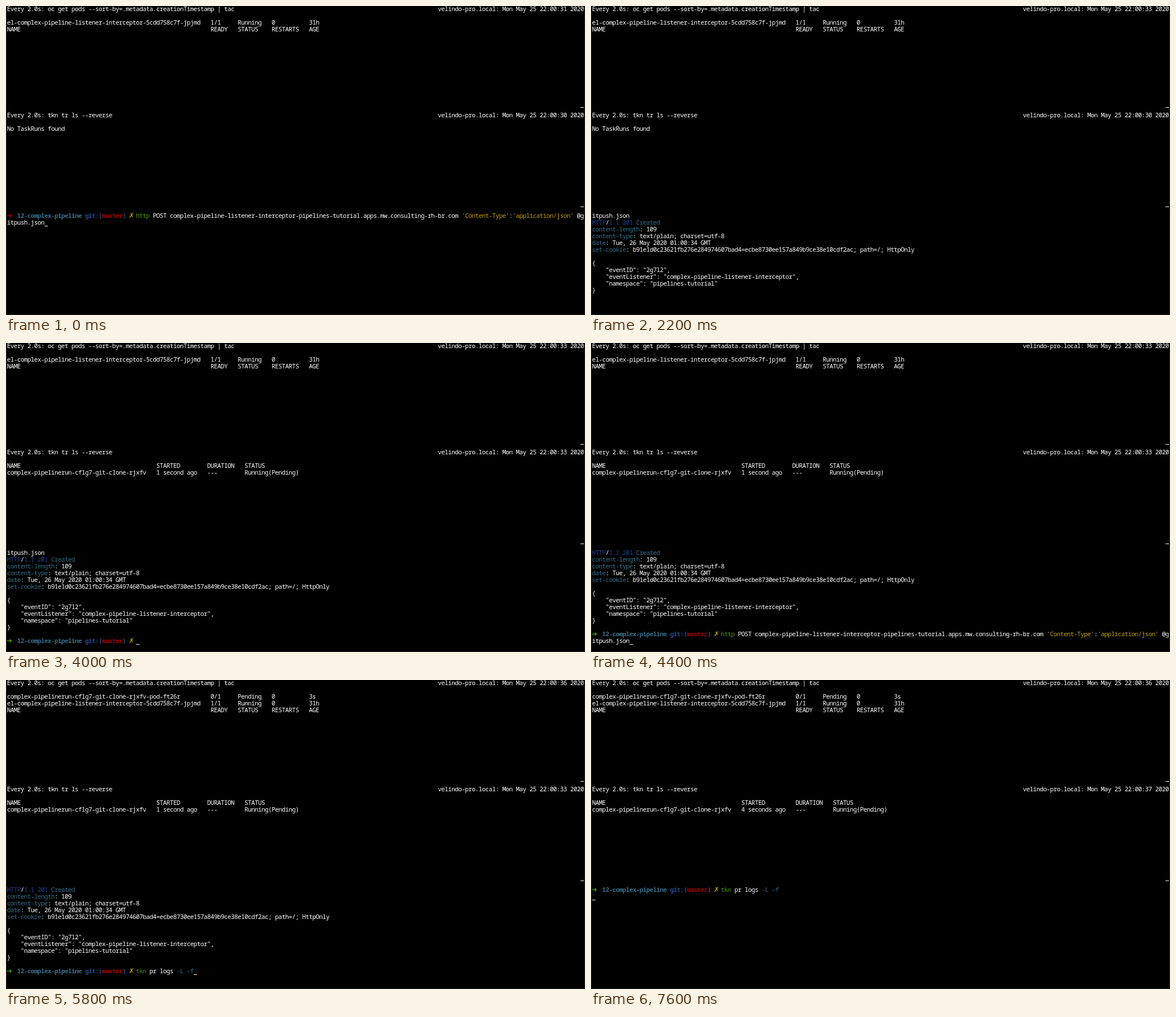
These frames come from a looping animation (1024 px wide and 547 px high, 8 s). An HTML page with a canvas:

```html
<!DOCTYPE html>
<html lang="en">
<head>
<meta charset="utf-8">
<title>Pipeline terminal</title>
<style>
  html, body { margin: 0; height: 100%; overflow: hidden; background: #000; }
  canvas { display: block; }
</style>
</head>
<body>
<canvas id="stage" width="1024" height="547"></canvas>
<script>
const ctx = document.getElementById('stage').getContext('2d');
const LOOP = 8000, COLS = 170, CELL = 6, ROW = 12, LEFT = 2;
const PANES = { pods: 9, tasks: 197, shell: 375 }; // first baselines
const FONT = 'semi-condensed 11px "Noto Sans Mono", "DejaVu Sans Mono", monospace';
const SYMBOL_FONT = '12px "DejaVu Sans", sans-serif';
const COLORS = { w: '#fff', c: '#34718a', b: '#234d94', d: '#1f4794', g: '#4e9a06', y: '#c4a000', r: '#a80000' };

// "~x" switches colour; a capital letter also makes the text bold.
const prompt = arrow => `~${arrow}➜  ~C12-complex-pipeline ~Bgit:(~Rmaster~B) ~Y✗ `;
const post = "~ghttp ~wPOST complex-pipeline-listener-interceptor-pipelines-tutorial" +
  ".apps.mw.consulting-rh-br.com ~y'Content-Type'~w:~y'application/json'~w @gitpush.json";
const logs = '~gtkn ~wpr logs ~c-L -f';
const response = [
  '~dHTTP~w/~d1.1 201 ~cCreated',
  '~ccontent-length~w: 109',
  '~ccontent-type~w: text/plain; charset=utf-8',
  '~cdate~w: Tue, 26 May 2020 01:00:34 GMT',
  '~cset-cookie~w: b91e1d0c23621fb276e284974607bad4=ecbe8730ee157a849b9ce38e10cdf2ac; path=/; HttpOnly',
  '',
  '{',
  '    "eventID": "2g7l2",',
  '    "eventListener": "complex-pipeline-listener-interceptor",',
  '    "namespace": "pipelines-tutorial"',
  '}',
  ''
];

const table = (widths, rows) =>
  rows.map(row => row.map((text, i) => text.padEnd(widths[i] || 0)).join(''));

function writeChar(char, col, baseline, bold) {
  const symbol = '➜✗'.includes(char);
  const x = LEFT + col % COLS * CELL;
  ctx.font = symbol ? SYMBOL_FONT : (bold ? 'bold ' : '500 ') + FONT;
  ctx.textAlign = symbol ? 'left' : 'center';
  ctx.fillText(char, symbol ? x - 1 : x + CELL / 2, baseline + Math.floor(col / COLS) * ROW);
}

function writeLine(line, baseline) {
  let col = 0, color = 'w';
  const chars = [...line];
  for (let i = 0; i < chars.length; i++) {
    if (chars[i] === '~') { color = chars[++i]; continue; }
    const key = color.toLowerCase();
    ctx.fillStyle = COLORS[key];
    if (chars[i] !== ' ') writeChar(chars[i], col, baseline, color !== key);
    col++;
  }
}

const writeLines = (pane, lines) =>
  lines.forEach((line, i) => writeLine(line, PANES[pane] + i * ROW));

function cursor(pane, row, col) {
  ctx.fillStyle = COLORS.w;
  ctx.fillRect(LEFT + col * CELL, PANES[pane] + row * ROW + 2, CELL, 1);
}

function watch(pane, command, second, lines, lastRow) {
  const title = 'Every 2.0s: ' + command;
  const clock = `velindo-pro.local: Mon May 25 22:00:${second} 2020`;
  writeLines(pane, [title + clock.padStart(COLS - title.length), '', ...lines]);
  cursor(pane, lastRow, COLS - 1);
}

function drawPods(t) {
  const rows = [
    ['el-complex-pipeline-listener-interceptor-5cdd758c7f-jpjmd', '1/1', 'Running', '0', '31h'],
    ['NAME', 'READY', 'STATUS', 'RESTARTS', 'AGE']
  ];
  if (t >= 4800) rows.unshift(['complex-pipelinerun-cflg7-git-clone-rjxfv-pod-ft26r', '0/1', 'Pending', '0', '3s']);
  watch('pods', 'oc get pods --sort-by=.metadata.creationTimestamp | tac',
    t < 2000 ? 31 : t < 4800 ? 33 : 36, table([60, 8, 10, 11], rows), 14);
}

function drawTasks(t) {
  const late = t >= 6200;
  const lines = t < 2800 ? ['No TaskRuns found'] : table([44, late ? 16 : 15, 11], [
    ['NAME', 'STARTED', 'DURATION', 'STATUS'],
    ['complex-pipelinerun-cflg7-git-clone-rjxfv', late ? '4 seconds ago' : '1 second ago', '---', 'Running(Pending)']
  ]);
  watch('tasks', 'tkn tr ls --reverse', t < 2800 ? 30 : late ? 37 : 33, lines, 13);
}

function shellLines(t) {
  if (t < 2200) return [prompt('R') + post];
  if (t < 2400) return ['itpush.json', ...response];
  if (t < 4400) return ['itpush.json', ...response, prompt('G')];
  if (t < 4800) return [...response, prompt('G') + post];
  if (t < 6000) return [...response, prompt('G') + logs];
  return [prompt('G') + logs];
}

// [start, end, row, column] of each visible spell of the shell cursor
const SPELLS = [
  [0, 600, 1, 11], [1200, 1800, 1, 11], [1800, 2200, 2, 0],
  [2800, 3400, 13, 38], [4000, 4400, 13, 38], [4400, 4800, 13, 11],
  [4800, 5400, 12, 55], [5800, 6000, 12, 55], [6000, 6400, 0, 55],
  [6400, 7000, 1, 0], [7600, 8000, 1, 0]
];

function draw(t) {
  ctx.fillStyle = '#000';
  ctx.fillRect(0, 0, 1024, 547);
  ctx.strokeStyle = '#222';
  ctx.strokeRect(0.5, -1.5, 1023, 548);
  drawPods(t);
  drawTasks(t);
  writeLines('shell', shellLines(t));
  const spell = SPELLS.find(([start, end]) => t >= start && t < end);
  if (spell) cursor('shell', spell[2], spell[3]);
}

const began = performance.now();
function tick() {
  draw((performance.now() - began) % LOOP);
  requestAnimationFrame(tick);
}
tick();
</script>
</body>
</html>
```
